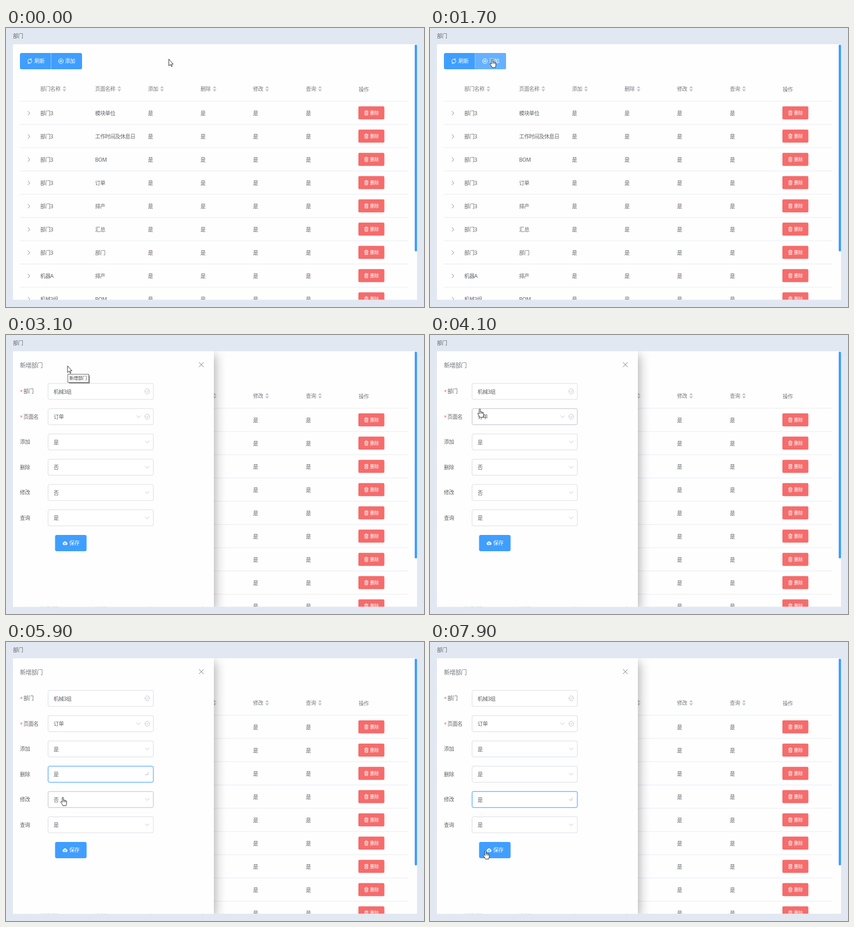
An HTML page that plays this animation: 720x480 px, repeating every 8000 ms.

```html
<!DOCTYPE html>
<html lang="zh-CN">
<head>
<meta charset="utf-8">
<style>
html, body { margin: 0; width: 100%; height: 100%; overflow: hidden; background: #e2e8f1; }
svg { display: block; width: 720px; height: 480px; }
text { font-family: "Noto Sans", "Noto Sans CJK SC", "Noto Sans CJK", sans-serif; letter-spacing: -.04em; white-space: pre; }
.line { fill: none; stroke-linecap: round; stroke-linejoin: round; }
.sheet { filter: drop-shadow(3px 6px 9px rgba(0,0,0,.3)); }
.menu { filter: drop-shadow(0 2px 5px rgba(0,0,0,.12)); }
</style>
</head>
<body>
<svg viewBox="0 0 720 480">
  <clipPath id="clip"><rect x="12" y="28" width="696" height="439.5"/></clipPath>
  <rect width="720" height="480" fill="#e2e8f1"/>
  <rect x="12" y="28" width="696" height="439.5" fill="#fefefe"/>
  <g clip-path="url(#clip)"><g id="table"></g><g id="drawer"></g></g>
  <g id="top"></g>
</svg>
<script>
const BLUE = '#409eff', RED = '#f56c6c', INK = '#606266', PALE = '#c0c4cc';
const $ = id => document.getElementById(id);

// y is the vertical middle of the text
const text = (x, y, s, size = 9, fill = INK, weight = 400) =>
  `<text x="${x}" y="${y + size * .38}" font-size="${size}" fill="${fill}" font-weight="${weight}">${s}</text>`;
const rect = (x, y, w, h, fill, r = 0, more = '') =>
  `<rect x="${x}" y="${y}" width="${w}" height="${h}" rx="${r}" fill="${fill}" ${more}/>`;
const line = (x, y, d, color = PALE, width = .9, turn = 0) =>
  `<path class="line" d="${d}" stroke="${color}" stroke-width="${width}" transform="translate(${x} ${y}) rotate(${turn})"/>`;

const CHEVRON = 'M-3.2-1.7L0 1.7 3.2-1.7';
const CIRCLE = 'M-4 0A4 4.3 0 0 1 4 0A4 4.3 0 0 1-4 0';
const CHECK = CIRCLE + 'M-1.9 0L-.4 1.7 2-1.4';
const PLUS = CIRCLE + 'M-2 0H2M0-2.1V2.1';
const REFRESH = 'M-3.2 1.2A3.4 3.6 0 0 1 2.4-2.6M3.2-1.2A3.4 3.6 0 0 1-2.4 2.6M.4-2.4H2.7V-4.4M-.4 2.4H-2.7V4.4';
const BIN = 'M-3.2-2.2H3.2M-1.2-2.4V-3.8H1.2V-2.4M-2.4-2V3.8H2.4V-2M-.8-.4V2.2M.8-.4V2.2';
const CLOUD = 'M-2.4 3.2A2.3 2.3 0 0 1-2.6-1.2A2.8 2.8 0 0 1 2.6-1.2A2.3 2.3 0 0 1 2.4 3.2Z';
const ARROW = 'M0 0V11.6L2.7 9.3 4.5 13 6 12.4 4.3 8.7H7.5Z';
const HAND = 'M-1 1.2Q.1-.6 1.2 1.2V5.5Q2.4 4.6 3.2 6Q4.5 5.3 5 6.5Q6.6 6 6.6 8V11L5.6 15H0L-1.6 11.5-3.8 9Q-3.6 7.2-1.8 8.2L-1 9Z';

const HEADS = [[59, '部门名称'], [153.5, '页面名称'], [244.5, '添加'], [335, '删除'], [425.5, '修改'], [516.5, '查询']];
const ROWS = [['部门3', '模块单位'], ['部门3', '工作时间及休息日'], ['部门3', 'BOM'], ['部门3', '订单'],
  ['部门3', '排产'], ['部门3', '汇总'], ['部门3', '部门'], ['机器A', '排产'], ['机械3组', 'BOM']];
const LABELS = ['部门', '页面名', '添加', '删除', '修改', '查询'];
const fieldY = i => 97 + 43.5 * i;

function table(hover) {
  let s = rect(24, 43, 107, 28, BLUE, 3);
  if (hover) s += rect(78, 43, 53, 28, '#66b1ff', 3);
  s += rect(77.3, 43, .8, 28, '#a9d2ff')
    + line(41, 57, REFRESH, '#fff') + text(49, 57, '刷新', 9, '#fff', 500)
    + line(94.7, 57, PLUS, '#fff') + text(101.5, 57, '添加', 9, '#fff', 500);
  for (const [x, name] of HEADS) {
    const c = x + name.length * 8.65 + 7;
    s += text(x, 104.5, name, 9, '#77797f', 500)
      + `<path d="M${c - 3.2} 103.6l3.2-3.8 3.2 3.8zm0 2h6.4l-3.2 3.8z" fill="${PALE}"/>`;
  }
  s += text(607.5, 105.5, '操作', 9, '#77797f', 500) + rect(24, 125.5, 668, 1, '#ebeef5');
  ROWS.forEach((row, i) => {
    const y = 146 + 40 * i;
    s += line(39.5, y + .5, CHEVRON, '#808389', .9, -90);
    HEADS.forEach(([x], k) => s += text(x, y + .5, row[k] || '是'));
    s += rect(607, y - 11.3, 44.7, 22.6, RED, 2) + line(620.7, y, BIN, '#fff', .8)
      + text(627, y, '删除', 7.8, '#fff', 500) + rect(24, y + 19.5, 668, 1, '#ebeef5');
  });
  return s + rect(704, 28.5, 4, 356, BLUE, 2);
}

const clamp = v => Math.max(0, Math.min(1, v));
// CSS "ease"
function ease(x) {
  let a = 0, b = 1;
  for (let i = 0; i < 20; i++) {
    const m = (a + b) / 2;
    if (.75 * m * (1 - m) + m ** 3 < x) a = m; else b = m;
  }
  return .3 * a * (1 - a) ** 2 + 3 * a * a * (1 - a) + a ** 3;
}
const quint = x => 1 - (1 - x) ** 5;
const openness = (t, [from, to], fn) =>
  t < to ? fn(clamp((t - from) / 300)) : 1 - fn(clamp((t - to) / 300));

// field index -> times of opening and choosing
const MENUS = { 3: [5040, 5750], 4: [6300, 7750] };
const PATH = [[0, 280.5, 53.5], [500, 280.5, 53.5], [1500, 107.5, 53], [2000, 106, 53], [3400, 106, 53],
  [3600, 104, 60], [4200, 82, 140], [4500, 90, 195], [4900, 98.3, 230.5], [5200, 98.3, 230.5],
  [5500, 98, 264], [5800, 98, 264], [6100, 97.5, 272], [6400, 97.5, 272], [6600, 97.7, 286.5],
  [7000, 97, 308], [7700, 97, 308], [7900, 95.5, 358.5], [8000, 95.5, 358.5]];

function pointer(t) {
  const i = PATH.findIndex(p => p[0] > t);
  const [t0, x0, y0] = PATH[i - 1], [t1, x1, y1] = PATH[i], k = (t - t0) / (t1 - t0);
  return [x0 + (x1 - x0) * k, y0 + (y1 - y0) * k];
}

function field(i, t, [px, py]) {
  const y = fieldY(i), must = i < 2, menu = MENUS[i];
  const focus = menu && t >= menu[0] && !(i == 3 && t >= MENUS[4][0]);
  const hover = px > 72 && px < 254 && Math.abs(py - y) < 14;
  const no = menu && t < menu[1];
  const value = ['机械3组', '订单'][i] || (no ? '否' : '是');
  const turn = menu ? -180 * openness(t, menu, ease) : 0;
  return (must ? text(24, y + 1, '*', 9, RED) : '') + text(must ? 30 : 24, y, LABELS[i])
    + rect(72.5, y - 13.8, 181.3, 27.6, '#fff', 2.5, `stroke="${focus ? BLUE : hover ? PALE : '#dcdfe6'}"`)
    + text(82, y + .3, value)
    + (i ? line(must ? 228.3 : 243.3, y, CHEVRON, PALE, .9, turn) : '')
    + (must ? line(243.3, y, CHECK, PALE) : '');
}

function menu(i, t, py) {
  const [from, to] = MENUS[i], open = openness(t, [from + 26, to + 26], quint);
  if (open <= 0) return '';
  const top = fieldY(i) + 22.3, chosen = t < to ? 1 : 0;
  const hot = py > top + 5 && py < top + 29 ? 0 : 1;
  return `<g transform="translate(0 ${top}) scale(1 ${open})" opacity="${open}">`
    + rect(72.5, 0, 181.3, 57.2, '#fff', 2.5, 'stroke="#e4e7ed" class="menu"')
    + rect(73, 5 + 24 * hot, 180.3, 24, '#f5f7fa')
    + ['是', '否'].map((s, k) => text(85, 17 + 24 * k, s, 9, k == chosen ? BLUE : INK)).join('') + '</g>';
}

function drawer(t, pos) {
  const p = ease(clamp((t - 1920) / 300));
  if (!p) return '';
  let s = `<g transform="translate(${-346 * (1 - p)} 0)" opacity="${p}">`
    + rect(12, 28, 346, 440, '#fefefe', 0, 'class="sheet"')
    + text(24, 52, '新增部门', 10.2, '#72767b')
    + line(336.5, 51, 'M-3.8-3.9L3.8 3.9M3.8-3.9L-3.8 3.9', '#72767b');
  LABELS.forEach((_, i) => s += field(i, t, pos));
  s += rect(84.5, 344, 54.3, 28, BLUE, 3)
    + `<path d="${CLOUD}" transform="translate(101.7 358)" fill="#fff"/>`
    + line(101.7, 358.6, 'M0 1.8V-1.2M-1.5 .2L0-1.3 1.5 .2', BLUE, .9)
    + text(109, 358, '保存', 9, '#fff', 500);
  return s + menu(3, t, pos[1]) + menu(4, t, pos[1]) + '</g>';
}

function isLink(t, x, y) {
  if (t < 2000) return x > 78 && x < 131 && y > 43 && y < 71;
  if (x < 72 || x > 254) return false;
  for (const i in MENUS) {
    const top = fieldY(+i) + 22.3;
    if (t > MENUS[i][0] && t < MENUS[i][1] && y > top) return y > top + 5 && y < top + 53;
  }
  return LABELS.some((_, i) => Math.abs(y - fieldY(i)) < 14) || (x > 84 && x < 139 && y > 344 && y < 372);
}

function overlay(t, [x, y], link) {
  let s = text(12, 13.5, '部门');
  if (t >= 2800 && t < 3500)
    s += rect(108.5, 69.5, 36, 14, 'rgba(0,0,0,.4)') + rect(106.5, 67.5, 36, 14, '#fff', 0, 'stroke="#767676"')
      + text(109, 74.5, '新增部门', 7.8, '#444');
  return s + `<path d="${link ? HAND : ARROW}" transform="translate(${x} ${y})" fill="#fff" stroke="#333" stroke-width=".9" stroke-linejoin="round"/>`
    + (link ? line(x, y, 'M1.2 5.5V8.5M3.2 6V8.7M5 6.6V8.8', '#333', .7) : '');
}

const start = performance.now();
let shown = -1;
function frame() {
  const t = Math.floor((performance.now() - start) % 8000 / 100) * 100;
  if (t !== shown) {
    shown = t;
    const pos = pointer(t), link = isLink(t, ...pos);
    $('table').innerHTML = table(t < 2000 && link);
    $('drawer').innerHTML = drawer(t, pos);
    $('top').innerHTML = overlay(t, pos, link);
  }
  requestAnimationFrame(frame);
}
frame();
</script>
</body>
</html>
```
